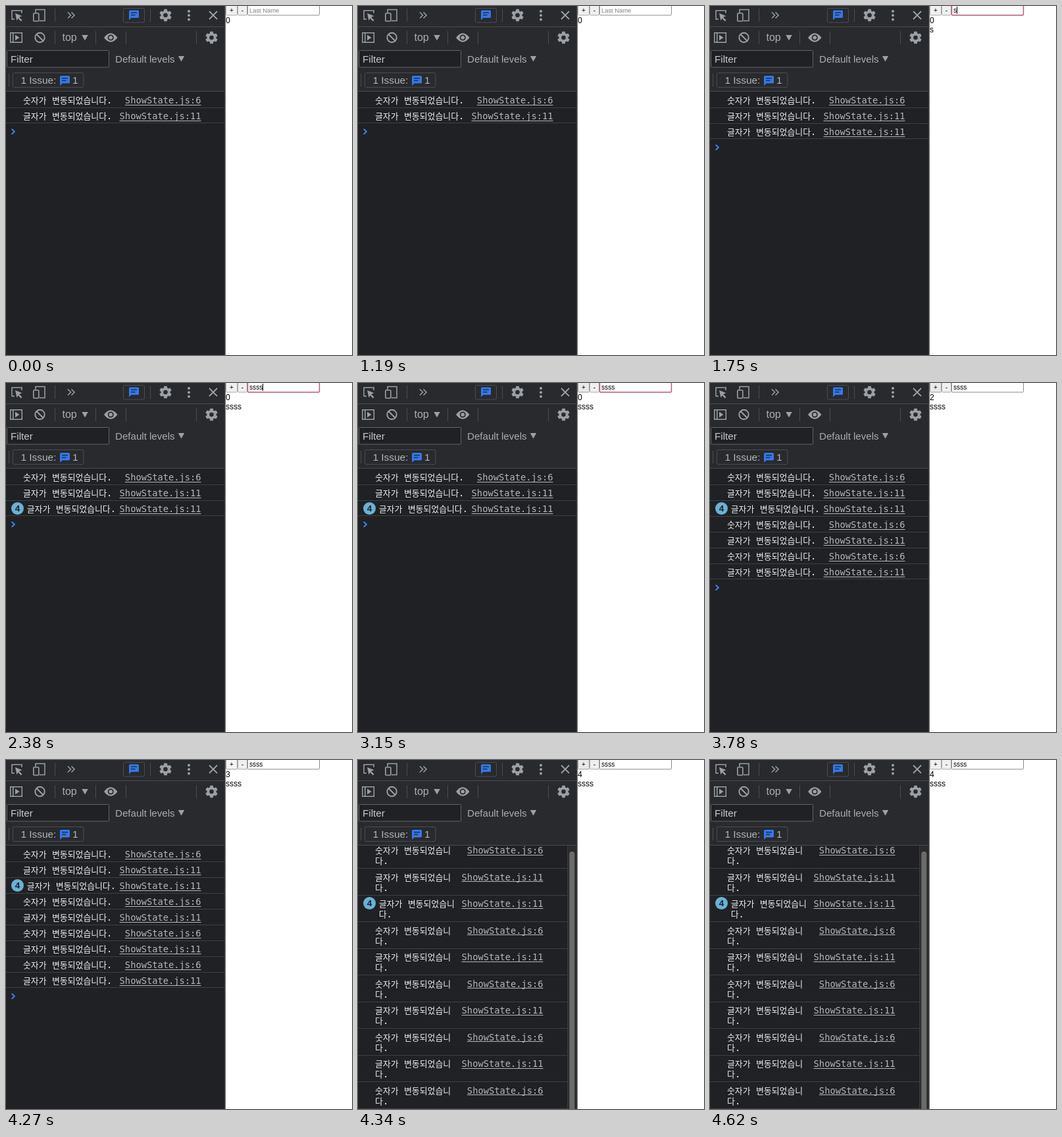
These frames come from a looping animation (526x530 px, 5320 ms). An HTML page with a canvas:

```html
<!DOCTYPE html>
<html lang="ko">
<head>
<meta charset="utf-8">
<style>
html, body { margin: 0; width: 100%; height: 100%; overflow: hidden; background: #fff; }
canvas { display: block; width: 526px; height: 530px; }
</style>
</head>
<body>
<canvas id="stage" width="526" height="530"></canvas>
<script>
const ctx = document.getElementById('stage').getContext('2d');
const LOOP = 5320;
const SANS = '"Liberation Sans", Arial, sans-serif';
const MONO = '13.73px "DejaVu Sans Mono", monospace';
const HANGUL = '500 12.9px "Noto Sans CJK KR", "Noto Sans CJK", sans-serif';
const BAR = '#292a2d', PANEL = '#202124', EDGE = '#4a4c50', ICON = '#9aa0a6', BLUE = '#3478ea';
const LABEL = '#a8adb2', LINK = '#b2b6ba';

const TYPED = [1750, 1960, 2240, 2380];
const CLICKS = [[3430, 3570], [3710, 3780], [3990, 4060], [4200, 4340]];
const FOCUS = 1400, BLUR = 3430, CARET_OFF = 3010, WRAP = 4340;

function rect(x, y, w, h, color) {
  ctx.fillStyle = color;
  ctx.fillRect(x, y, w, h);
}

function box(x, y, w, h, radius, fill, stroke, width = 1) {
  ctx.beginPath();
  ctx.roundRect(x, y, w, h, radius);
  if (fill) { ctx.fillStyle = fill; ctx.fill(); }
  if (stroke) { ctx.strokeStyle = stroke; ctx.lineWidth = width; ctx.stroke(); }
}

function disc(x, y, r, color) {
  ctx.beginPath();
  ctx.arc(x, y, r, 0, Math.PI * 2);
  ctx.fillStyle = color;
  ctx.fill();
}

function line(points, color = ICON, width = 1.5) {
  ctx.beginPath();
  points.forEach(([x, y]) => ctx.lineTo(x, y));
  ctx.strokeStyle = color;
  ctx.lineWidth = width;
  ctx.stroke();
}

function shape(points, color = ICON) {
  ctx.beginPath();
  points.forEach(([x, y]) => ctx.lineTo(x, y));
  ctx.fillStyle = color;
  ctx.fill();
}

function text(value, x, y, font, color, align = 'left') {
  ctx.font = font;
  ctx.fillStyle = color;
  ctx.textAlign = align;
  ctx.fillText(value, x, y);
}

const sans = (value, x, y, size, color, align) => text(value, x, y, `${size}px ${SANS}`, color, align);

function gear(x, y) {
  ctx.save();
  ctx.translate(x, y);
  disc(0, 0, 7, ICON);
  for (let i = 0; i < 6; i++) {
    ctx.rotate(Math.PI / 3);
    shape([[-3, -5], [-2.2, -9.3], [2.2, -9.3], [3, -5]]);
  }
  disc(0, 0, 3.3, BAR);
  ctx.restore();
}

function bubble(x, y) {
  box(x, y, 15, 11.5, 1.5, BLUE);
  shape([[x, y + 8], [x, y + 15], [x + 4, y + 11]], BLUE);
  rect(x + 3, y + 3, 9, 1.4, '#202a3c');
  rect(x + 3, y + 6.5, 6.5, 1.4, '#202a3c');
}

const downArrow = (x, y) => shape([[x - 4.7, y - 4], [x + 4.7, y - 4], [x, y + 4.5]]);

function toolbarIcons() {
  // inspect and device toggles
  line([[13, 20], [9, 20], [9, 7], [24, 7], [24, 11]]);
  shape([[14, 11], [24.5, 15.2], [20, 17], [24.5, 21.5], [22.8, 23.2], [18.3, 18.7], [16.5, 22.5]]);
  line([[45, 10], [45, 5.5], [59, 5.5], [59, 22.5], [51, 22.5]]);
  box(41.8, 11, 8, 12, 1, BAR, ICON, 1.6);
  for (const x of [94, 99.5]) line([[x, 9.5], [x + 4.5, 14], [x, 18.5]]);
  box(178.5, 3.5, 32, 21.5, 2, null, EDGE);
  bubble(187, 6.5);
  gear(242.5, 14);
  for (const y of [8, 14.3, 20.6]) disc(278, y, 2, ICON);
  line([[309, 8], [321, 20]], ICON, 1.8);
  line([[321, 8], [309, 20]], ICON, 1.8);

  // console controls
  box(6.8, 40.8, 17.5, 14.5, 0, null, ICON, 1.5);
  line([[10.8, 41], [10.8, 55]]);
  shape([[14, 43.8], [20.5, 48], [14, 52.2]]);
  ctx.beginPath();
  ctx.arc(51.5, 48, 7.2, 0, Math.PI * 2);
  ctx.lineWidth = 1.9;
  ctx.stroke();
  line([[46.5, 43], [56.5, 53]], ICON, 1.9);
  sans('top', 85.5, 53, 16, LABEL);
  downArrow(120, 48);
  ctx.beginPath();
  ctx.moveTo(149, 48);
  ctx.quadraticCurveTo(159, 34.5, 169.5, 48);
  ctx.quadraticCurveTo(159, 61.5, 149, 48);
  ctx.fillStyle = ICON;
  ctx.fill();
  disc(159.2, 48, 4.6, BAR);
  disc(159.2, 48, 2.8, ICON);
  gear(312.5, 48);
}

function toolbars() {
  rect(0, 0, 332, 129, BAR);
  rect(0, 31, 332, 1, EDGE);
  rect(0, 129, 332, 1, EDGE);
  for (const x of [74, 219]) rect(x, 4, 1, 20, EDGE);
  for (const x of [74, 136, 182, 289]) rect(x, 38, 1, 20, EDGE);
  toolbarIcons();
  box(1.5, 67.5, 155, 25.5, 1, PANEL, '#606368');
  sans('Filter', 7, 86, 15.2, '#c6cacf');
  sans('Default levels', 166, 86, 15.1, LABEL);
  downArrow(266.5, 80);
  rect(4, 103, 1, 19, EDGE);
  box(10.5, 101.5, 107.5, 22, 2, null, EDGE);
  sans('1 Issue:', 22.5, 118, 15.4, '#b0b5ba');
  bubble(82, 106);
  sans('1', 101, 118, 15.4, '#b0b5ba');
}

function logRow(subject, source, cy, wrapped, count) {
  const ink = '#eceef0', y = cy + 5, x = count > 1 ? 31.7 : 26;
  if (count > 1) {
    disc(17.5, cy - 0.5, 9.5, '#6bb0d6');
    text(count, 17.5, cy + 4.3, `bold 13.5px ${SANS}`, '#15202a', 'center');
  }
  text(subject, x, y, HANGUL, ink);
  text(wrapped ? '변동되었습니' : '변동되었습니다', x + 44, y, HANGUL, ink);
  if (wrapped) text('다', x, y + 16.3, HANGUL, ink);
  const dotX = x + (wrapped ? 11.9 : 127);
  text('.', dotX, y + (wrapped ? 16.3 : 0), MONO, ink);

  const right = wrapped ? 281.5 : 296.5;
  text(source, right, y, MONO, LINK, 'right');
  const width = ctx.measureText(source).width;
  rect(right - width, Math.round(y + 1.7), width, 1, LINK);
}

function consoleLog(typed, count, wrapped) {
  rect(0, 130, 332, 400, PANEL);
  const rows = ['num', 'str'];
  if (typed) rows.push('typed');
  for (let i = 0; i < count; i++) rows.push('num', 'str');
  const pitch = wrapped ? 40.5 : 24;
  const top = wrapped ? 124.5 : 130.5;
  const width = wrapped ? 318 : 332;

  ctx.save();
  ctx.beginPath();
  ctx.rect(0, 130, 332, 400);
  ctx.clip();
  rows.forEach((kind, i) => {
    const y = top + i * pitch;
    const isNumber = kind === 'num';
    const isLast = i === rows.length - 1;
    logRow(isNumber ? '숫자가' : '글자가', isNumber ? 'ShowState.js:6' : 'ShowState.js:11',
      y + 12.5, wrapped, kind === 'typed' ? typed : 1);
    rect(0, Math.round(y + pitch - 0.6) - (isLast ? 1 : 0), width, 1, '#3e4044');
  });
  if (wrapped) {
    rect(318, 130, 14, 400, '#2b2b2c');
    rect(318, 130, 1, 400, '#3a3a3b');
    box(321.3, 139, 8, 420, 4, '#6b6b6b');
  } else {
    const y = top + rows.length * pitch + 12.3;
    line([[8.7, y - 4], [12.9, y], [8.7, y + 4]], '#3b82f6', 1.9);
  }
  ctx.restore();
}

function button(label, x, w, hover, active) {
  box(x + 0.5, -2.5, w - 1, 16.5, 1.5, active ? '#f5f5f5' : hover ? '#e9e9e9' : '#f0f0f0', hover ? '#999' : '#a8a8a8');
  sans(label, x + w / 2, 9.5, 10, '#000', 'center');
}

function page(t, typed, count) {
  rect(332, 0, 194, 530, '#fff');
  rect(332, 0, 1, 530, '#3c3d40');
  rect(333, 0, 1, 530, '#6a6b6d');
  const pressed = CLICKS.some(([down, up]) => t >= down && t < up);
  button('+', 334, 18, t >= 3010 && t < 4620, pressed);
  button('-', 352, 15, t >= 2870 && t < 3010, false);

  const focused = t >= FOCUS && t < BLUR;
  box(367.5, -2.5, 109, 16.5, 1.5, '#fff', focused ? '#bd5681' : '#8a8a8a', focused ? 1.5 : 1);
  const value = 's'.repeat(typed);
  if (typed) sans(value, 370, 9.5, 10.2, '#000');
  else sans('Last Name', 370, 9.5, 9.4, '#808080');
  if (focused && t < CARET_OFF) rect(370 + Math.round(typed * 5.1), 1, 1, 11, '#000');

  sans(count, 334, 26.4, 12.3, '#000');
  sans(value, 334, 40.4, 12, '#000');
}

function draw(t) {
  const typed = TYPED.filter(at => t >= at).length;
  const count = CLICKS.filter(([, up]) => t >= up).length;
  consoleLog(typed, count, t >= WRAP);
  toolbars();
  page(t, typed, count);
}

function tick() {
  draw(performance.now() % LOOP);
  requestAnimationFrame(tick);
}
tick();
</script>
</body>
</html>
```
